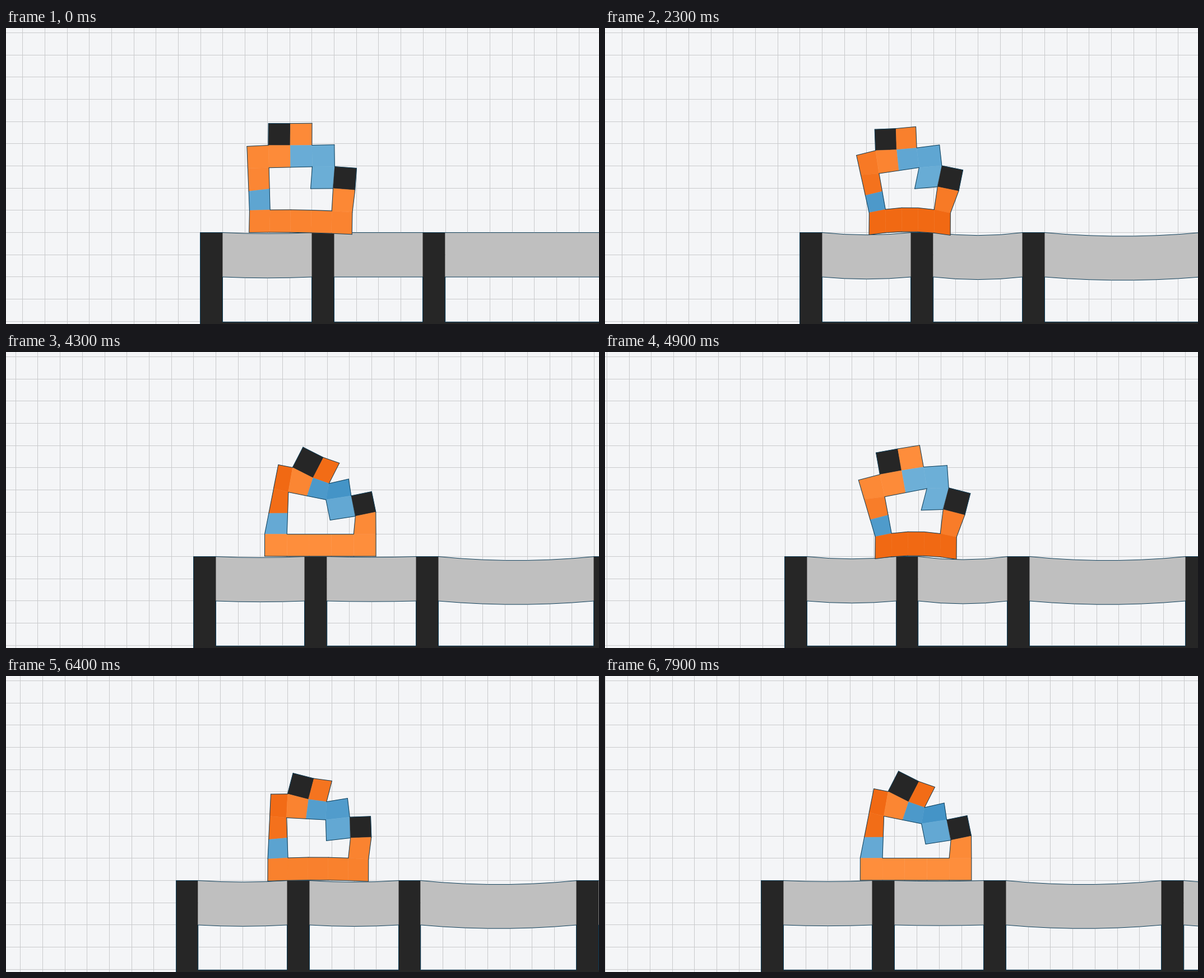
These frames come from a looping animation (1058 by 529 pixels, 8000 ms). An HTML page with a canvas:

```html
<!DOCTYPE html>
<html lang="en">
<head>
<meta charset="utf-8">
<title>Soft walker on a bridge</title>
<style>
  html, body { margin: 0; width: 100%; height: 100%; overflow: hidden; background: #f4f5f7; }
  canvas { display: block; width: 1058px; height: 529px; }
</style>
</head>
<body>
<canvas id="stage" width="1058" height="529"></canvas>
<script>
const W = 1058, H = 529, LOOP = 8000, TICK = 100;
const U = 39.7, DECK = 365.6;
const LINE = '#0d3d58', RIGID = '#262626', SOFT = '#bfbfbf';
const ctx = document.getElementById('stage').getContext('2d');

// Body layout: K rigid, O horizontal muscle, B vertical muscle
const LAYOUT = ['.KO..', 'OOBB.', 'O..BK', 'B...O', 'OOOOO'];
const RAMP = {
  O: [[241, 105, 19], [254, 142, 60]],
  B: [[66, 146, 198], [109, 175, 215]]
};

// Guiding corners (row, column) and where they go, from the middle of the sole,
// with the base drawn in and with the top drawn in
const GUIDES = [[0, 1], [1, 2], [1, 0], [1, 3], [1, 4], [2, 1], [2, 3], [2, 4], [3, 5]];
const BASE_IN = [[-72, -189.5], [-26, -158], [-103, -140.5], [13, -164.5], [55, -167.5],
  [-56, -111], [19, -126], [58, -127.5], [87, -79]];
const TOP_IN = [[-31, -195], [-13, -140], [-75, -163.5], [15.5, -130], [50.5, -138],
  [-57, -114.5], [10, -101], [55, -108], [99, -79]];

// time, distance from the first pillar, tilt in degrees, base and top contraction
const GAIT = [
  [0, 178.2, 1, 0.28, 0.08],
  [600, 183.8, 0, 0, 0.9],
  [1800, 191, 0.3, 1, 0],
  [2300, 195.8, 0.3, 1, 0.3],
  [3800, 223, -7.2, 0, 1],
  [4300, 226, 0, 0, 1],
  [4900, 233.3, 0.3, 1, 0],
  [5700, 249, -4.8, 0, 1],
  [6200, 251, 0, 0, 1],
  [6700, 258.5, 0.3, 1, 0],
  [7100, 267.5, 0.2, 0.5, 0.27],
  [7900, 275.8, 0, 0, 1]
];
// time, screen position of the first pillar
const CAMERA = [
  [0, 347.3], [2300, 347.8], [3800, 343.2], [4900, 321.2],
  [5700, 311.2], [7100, 295], [7900, 278.8]
];

const mix = (a, b, k) => a + (b - a) * k;
const lerp = (p, q, k) => [mix(p[0], q[0], k), mix(p[1], q[1], k)];

// Smooth interpolation through timed keys, without overshoot
function sample(keys, t) {
  const last = keys.length - 1;
  let i = 0;
  while (i < last - 1 && keys[i + 1][0] <= t) i++;
  const a = keys[i], b = keys[i + 1], d = b[0] - a[0];
  const s = Math.min(1, (t - a[0]) / d), s2 = s * s, s3 = s2 * s;
  const slope = (j, k) => (keys[j + 1][k] - keys[j][k]) / (keys[j + 1][0] - keys[j][0]);
  const tangent = (j, k) => {
    if (j === 0 || j === last) return slope(j ? j - 1 : 0, k);
    const m = slope(j - 1, k), n = slope(j, k);
    return m * n > 0 ? 2 * m * n / (m + n) : 0;
  };
  return a.map((v, k) => k && v * (2 * s3 - 3 * s2 + 1) + b[k] * (3 * s2 - 2 * s3)
    + d * (tangent(i, k) * (s3 - 2 * s2 + s) + tangent(i + 1, k) * (s3 - s2))).slice(1);
}

// Right and left corners of the square whose diagonal runs from p down to q
function square(p, q) {
  const [x, y] = lerp(p, q, 0.5), dx = x - p[0], dy = y - p[1];
  return [[x + dy, y - dx], [x - dy, y + dx]];
}

const add = (p, to, from) => [p[0] + to[0] - from[0], p[1] + to[1] - from[1]];

// Mesh corners as m[row][column] for the given contractions
function shapeBody(base, top) {
  const m = Array.from({ length: 6 }, () => []);
  GUIDES.forEach(([r, c], i) => {
    const grid = [(c - 2.5) * U, (r - 5) * U];
    m[r][c] = grid.map((g, k) =>
      g + base * (BASE_IN[i][k] - g) + top * (TOP_IN[i][k] - g));
  });
  const width = 5 * U - 53.5 * base;
  for (let c = 0; c <= 5; c++) {
    const s = c / 5, arch = 4 * s * (1 - s) * base;
    m[5][c] = [(s - 0.5) * width, -6 * arch];
    m[4][c] = [(s - 0.5) * width, -39.5 - 9.5 * arch];
  }
  [m[0][2], m[1][1]] = square(m[0][1], m[1][2]);
  [m[2][5], m[3][4]] = square(m[2][4], m[3][5]);
  m[0][3] = add(m[0][2], m[1][3], m[1][2]);
  m[3][3] = add(m[2][3], m[3][4], m[2][4]);
  m[2][0] = lerp(m[1][0], m[4][0], 0.34);
  m[3][0] = lerp(m[1][0], m[4][0], 0.7);
  m[2][2] = lerp(m[2][1], m[2][3], 0.5);
  m[3][1] = lerp(m[2][1], m[4][1], 0.5);
  return m;
}

const cells = [], outline = [];
LAYOUT.forEach((row, r) => [...row].forEach((kind, c) => {
  if (kind === '.') return;
  const q = [[r, c], [r, c + 1], [r + 1, c + 1], [r + 1, c]];
  cells.push({ kind, q });
  [[r - 1, c], [r, c + 1], [r + 1, c], [r, c - 1]].forEach(([y, x], k) => {
    if (((LAYOUT[y] || '')[x] || '.') === '.') outline.push([q[k], q[(k + 1) % 4]]);
  });
}));

// Muscles darken as they shorten
function shade(kind, pts) {
  if (kind === 'K') return RIGID;
  const len = (a, b) => Math.hypot(pts[a][0] - pts[b][0], pts[a][1] - pts[b][1]);
  const mean = (kind === 'O' ? len(0, 1) + len(3, 2) : len(0, 3) + len(1, 2)) / 2;
  const k = Math.min(1, Math.max(0, (mean / U - 0.74) / 0.26));
  const [dark, light] = RAMP[kind];
  return `rgb(${dark.map((v, i) => Math.round(mix(v, light[i], k)))})`;
}

function trace(pts) {
  ctx.beginPath();
  pts.forEach(([x, y]) => ctx.lineTo(x, y));
}

function stroke(pts) {
  trace(pts);
  ctx.strokeStyle = LINE;
  ctx.stroke();
}

function drawGrid(pillar) {
  ctx.fillStyle = '#f4f5f7';
  ctx.fillRect(0, 0, W, H);
  ctx.fillStyle = '#c9cacc';
  for (let x = pillar % U; x < W; x += U) ctx.fillRect(Math.round(x - 0.5), 0, 1, H);
  for (let y = DECK % U; y < H; y += U) ctx.fillRect(0, Math.round(y - 0.5), W, 1);
}

function drawBridge(pillar, sags) {
  const floor = Math.ceil(DECK + 4 * U), low = DECK + 2 * U;
  const starts = [0, 5, 10, 18, 26];
  const snap = x => Math.round(x) - 0.5;
  starts.slice(0, 4).forEach((s, i) => {
    const n = starts[i + 1] - s - 1, sag = sags[Math.min(i, 2)];
    const curve = (y, drop) => Array.from({ length: n + 1 }, (_, k) =>
      [pillar + (s + 1 + k) * U, y + drop * 4 * k * (n - k) / (n * n)]);
    const upper = curve(DECK, sag), under = curve(low, sag * 0.9);
    trace([...upper, ...under.slice().reverse()]);
    ctx.fillStyle = SOFT;
    ctx.fill();
    stroke(upper);
    stroke(under);
  });
  ctx.fillStyle = RIGID;
  ctx.fillRect(pillar, floor, W, H - floor);
  stroke([[pillar, floor + 0.5], [W, floor + 0.5]]);
  starts.forEach((s, i) => {
    const left = snap(pillar + s * U), right = snap(pillar + (s + 1) * U);
    ctx.fillStyle = RIGID;
    ctx.fillRect(left, DECK, right - left, H - DECK);
    stroke([[left, DECK], [right, DECK]]);
    stroke([[left, i ? low : DECK], [left, i ? floor : H]]);
    stroke([[right, low], [right, floor]]);
  });
}

function drawWalker(x, y, tilt, mesh) {
  const a = tilt * Math.PI / 180, cos = Math.cos(a), sin = Math.sin(a);
  const point = ([r, c]) => {
    const [u, v] = mesh[r][c];
    return [x + u * cos - v * sin, y + u * sin + v * cos];
  };
  cells.forEach(({ kind, q }) => {
    const pts = q.map(point);
    trace(pts);
    ctx.closePath();
    ctx.fillStyle = ctx.strokeStyle = shade(kind, pts);
    ctx.fill();
    ctx.lineWidth = 0.5;
    ctx.stroke();
  });
  ctx.lineWidth = 1;
  outline.forEach(edge => stroke(edge.map(point)));
}

function draw(t) {
  const [pillar] = sample(CAMERA, t);
  const [x, tilt, base, top] = sample(GAIT, t);
  const settle = 1 - Math.exp(-t / 900);
  const sags = [1.8 + 2.5 * base - 0.55 * tilt, (1.2 + 4.3 * base) * settle, 7 * settle];
  ctx.lineWidth = 1;
  ctx.lineCap = ctx.lineJoin = 'round';
  drawGrid(pillar);
  drawBridge(pillar, sags);
  drawWalker(pillar + x, 365 + 4.7 * base + 0.9 * tilt, tilt, shapeBody(base, top));
}

let start = null;
function frame(now) {
  if (start === null) start = now;
  draw(Math.floor((now - start) % LOOP / TICK) * TICK);
  requestAnimationFrame(frame);
}
draw(0);
requestAnimationFrame(frame);
</script>
</body>
</html>
```
